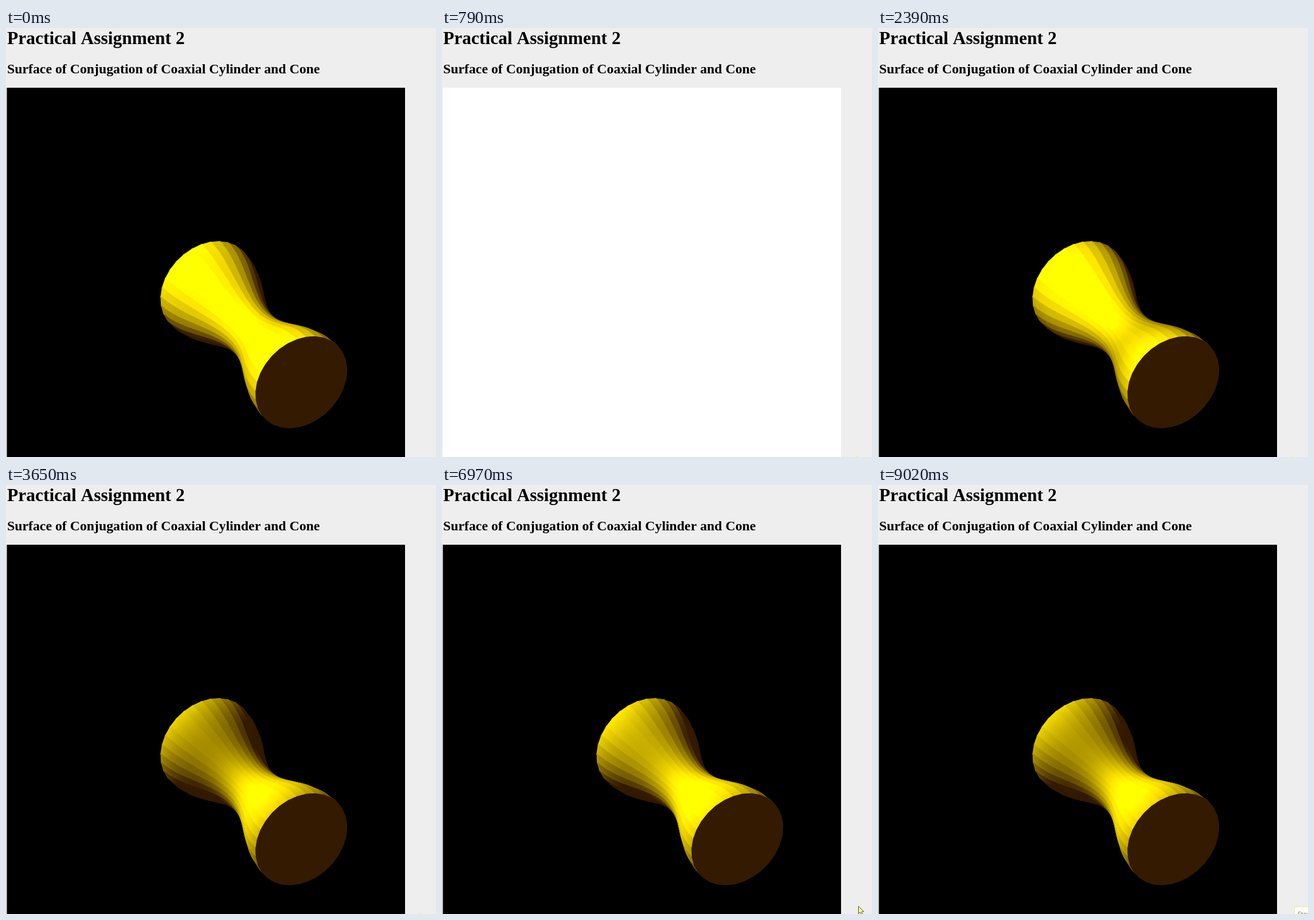
An HTML page with a canvas for the animation above (9.08 s loop, 750 by 747 pixels).

```html
<!DOCTYPE html>
<html lang="en">
<head>
<meta charset="utf-8">
<title>Practical Assignment 2</title>
<style>
  html, body { margin: 0; width: 100%; height: 100%; overflow: hidden; background: #eee; }
  h1, h2, canvas { position: absolute; margin: 0; white-space: nowrap; }
  h1, h2 {
    left: 2px; color: #000; font-kerning: none;
    font-family: "Liberation Serif", "Times New Roman", serif; font-weight: bold;
  }
  h1 { top: 0; font-size: 31.5px; line-height: 36px; }
  h2 { top: 57.5px; font-size: 23.8px; line-height: 27px; }
  canvas { left: 0; top: 0; }
</style>
</head>
<body>
<canvas id="stage" width="750" height="747"></canvas>
<h1>Practical Assignment 2</h1>
<h2>Surface of Conjugation of Coaxial Cylinder and Cone</h2>
<script>
const ctx = document.getElementById('stage').getContext('2d');
const LOOP = 9080, TAU = Math.PI * 2;
const RIM = 90, WAIST = 46.5, LENGTH = 364;
const STEP = 0.2, RINGS = 60;
const CX = 349.3, CY = 451;
const TILT = 0.7, C = Math.cos(TILT), S = Math.sin(TILT);
const FACING = Math.PI * 0.75; // azimuth turned towards the viewer

const radius = z => WAIST + (RIM - WAIST) * (1 + Math.cos(TAU * z / LENGTH)) / 2;
const slope = z => -(RIM - WAIST) * Math.PI / LENGTH * Math.sin(TAU * z / LENGTH);

// Rotation by TILT about the (1, 1, 0) diagonal, seen orthographically
function project(angle, z) {
  const x = radius(z) * Math.cos(angle), y = radius(z) * Math.sin(angle);
  const near = (1 + C) / 2, far = (1 - C) / 2, shift = z * S * Math.SQRT1_2;
  return [CX + near * x + far * y + shift, CY - far * x - near * y + shift];
}

function polygon(points, color) {
  ctx.beginPath();
  points.forEach(p => ctx.lineTo(...p));
  ctx.closePath();
  ctx.fillStyle = color;
  ctx.fill();
}

function shade(light) {
  const channel = ambient => Math.round(255 * Math.min(1, ambient + Math.max(0, light)));
  return `rgb(${channel(0.2)},${channel(0.1)},0)`;
}

// Visible faces from the far end to the near one; each reaches a little
// under the next so that no seams show
const faces = [], cap = [];
for (let i = 0; i < RINGS; i++) {
  const dz = LENGTH / RINGS, z0 = i * dz, z1 = Math.min(LENGTH, z0 + 2 * dz);
  const dr = slope(z0 + dz / 2), size = Math.hypot(1, dr);
  for (let a0 = 0; a0 < TAU; a0 += STEP) {
    const a1 = a0 + STEP * 1.2;
    const out = Math.cos(a0 + STEP / 2 - FACING) / size, along = -dr / size;
    if (out * S + along * C < -0.08) continue;
    faces.push({
      out, along,
      points: [project(a0, z0), project(a1, z0), project(a1, z1), project(a0, z1)]
    });
  }
}
for (let a = 0; a < TAU; a += STEP) cap.push(project(a, LENGTH));

function drawSurface(t) {
  const time = t < 860 ? t + 150 : t;
  const height = -0.3 + 0.65 * Math.cos(TAU * (time - 5170) / 2750);
  const norm = Math.hypot(1, height);
  for (const f of faces) polygon(f.points, shade((f.out + f.along * height) / norm));
  polygon(cap, shade(0));
}

function drawPointer(x, y) {
  const shape = [[0, 0], [0, 13], [3, 10], [5.5, 15], [7.5, 14], [5.5, 9.5], [9, 9]];
  polygon(shape.map(([px, py]) => [x + px, y + py]), '#ffff9c');
  ctx.lineWidth = 1;
  ctx.strokeStyle = '#55502a';
  ctx.stroke();
}

function drawTooltip(alpha) {
  ctx.globalAlpha = alpha;
  ctx.fillStyle = '#fffff4';
  ctx.fillRect(726, 734, 24, 13);
  ctx.strokeStyle = '#eee0a0';
  ctx.lineWidth = 1;
  ctx.strokeRect(726.5, 734.5, 40, 30);
  ctx.fillStyle = '#77735f';
  ctx.font = '11px "Open Sans", sans-serif';
  ctx.fillText('Stop', 732, 751);
  ctx.globalAlpha = 1;
}

function draw(t) {
  const blank = t >= 790 && t < 860;
  ctx.clearRect(0, 0, 750, 747);
  ctx.fillStyle = blank ? '#fff' : '#000';
  ctx.fillRect(1.5, 104, 694.5, 643);
  if (!blank) drawSurface(t);
  if (t >= 720 && t < 6970) {
    ctx.fillStyle = '#f3edaa';
    ctx.fillRect(722, 745, 4, 2);
  } else if (t >= 6970 && t < 7900) {
    drawPointer(726.5, 733.5);
  }
  if (t > 8600) drawTooltip(Math.min(1, (t - 8600) / 350));
}

const start = performance.now();
function frame() {
  draw((performance.now() - start) % LOOP);
  requestAnimationFrame(frame);
}
frame();
</script>
</body>
</html>
```
